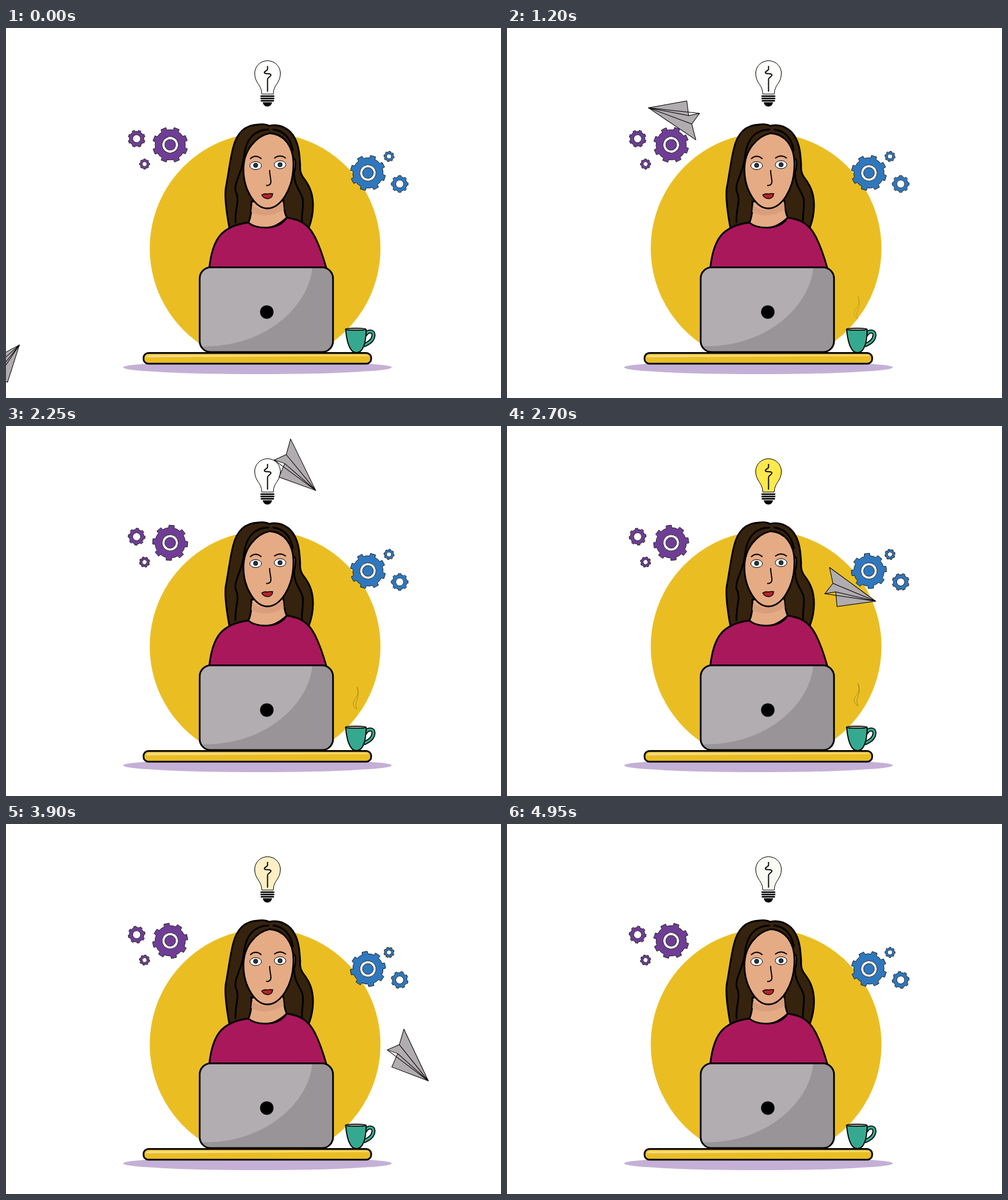
Animation, 811 px wide and 605 px high, one loop 5940 ms. Source, as an HTML page:

```html
<!DOCTYPE html>
<html lang="en">
<head>
<meta charset="utf-8">
<title>Ideas at work</title>
<style>
html, body { margin: 0; width: 100%; height: 100%; overflow: hidden; background: #fff; }
svg { display: block; width: 811px; height: 605px; }
.ink { stroke: #000; stroke-width: 2.8; stroke-linejoin: round; stroke-linecap: round; }
.thin { stroke: #000; stroke-width: 1; stroke-linejoin: round; }
.line { fill: none; }
</style>
</head>
<body>
<svg viewBox="0 0 811 605">
  <circle cx="424.500" cy="360.300" r="189" fill="#eabe23"/>
  <ellipse cx="412" cy="555" rx="220" ry="11" fill="#c4b0d6"/>

  <g id="bulb">
    <path id="glass" class="thin" d="M419 108C419 92 407.500 91 407.500 74A21 20.500 0 0 1 449.500 74C449.500 91 438 92 438 108Z"/>
    <path class="line" stroke="#000" stroke-width="1.800" d="M428.500 62V67C428.500 71 422 70 423.500 73.500C425 76 434 73 434 77C433 81 428.500 80 428.500 84V104"/>
    <path stroke="#000" stroke-width="2.600" stroke-linecap="round" d="M418 111.500H438.500M418 115.200H438.500M418.500 119H438"/>
    <path d="M420.500 121.500H436Q434 128.500 428.300 128.500Q422.500 128.500 420.500 121.500Z"/>
  </g>

  <g id="woman">
    <path class="ink" fill="#36230d" d="M366 327C361 300 358 278 360 262C365 236 367 215 372 196C378 172 390 159 412 158Q424 156 431 160C448 156 465 164 473 180C480 193 481 208 482 225Q481 235 486 243C497 257 503 270 503 290Q503 309 496 327Z"/>
    <path class="ink" fill="#e5ab85" d="M402 284C403 302 400 312 397 319Q428 340 460 310Q455 300 454 278Z"/>
    <path fill="#d99f7d" d="M403 290Q428 307 454 285L455 297Q428 314 402 301Z"/>
    <path class="ink" fill="#e5ab85" d="M470 214Q475 212 474 224Q474 236 470 238Z"/>
    <path class="ink" fill="#e5ab85" d="M432 172C410 177 389 199 389 231C389 266 409 295 428 295C449 295 471 265 471 222C471 193 455 173 432 172Z"/>
    <path class="ink line" d="M430 166C407 166 393 182 390 209C388 235 374 250 376 266C384 282 375 293 376 318M438 166C455 168 466 180 470 200M472 238C472 258 482 265 486 279C488 293 484 302 485 316"/>
    <g class="line" stroke="#000" stroke-width="1.900" stroke-linecap="round">
      <path d="M400.500 213.500Q409 206 418 213.500M440 212.500Q449 206 458 212.500"/>
      <path d="M432 233C432 241 434 246 434 251Q434 257.500 427 257.500"/>
    </g>
    <g fill="#fff" stroke="#000" stroke-width="1">
      <ellipse cx="409" cy="225" rx="9.500" ry="6.500"/>
      <ellipse cx="449" cy="223.500" rx="9.500" ry="6.500"/>
    </g>
    <g fill="#22354a" stroke="#000"><circle cx="409" cy="224.500" r="3.500"/><circle cx="449" cy="223.500" r="3.500"/></g>
    <path fill="#b4242b" stroke="#000" stroke-width="1.400" d="M419 273Q424 270 428 271.500Q433 270 437 271Q436 279 429 279Q422 279 419 273Z"/>
    <path class="ink" fill="#a9185b" d="M333 393C338 346 352 324 397 318C408 329 446 332 460 310C492 315 506 326 525 393Z"/>
  </g>

  <g id="desk" transform="translate(-.2 -.6)">
    <rect x="225.500" y="532" width="373" height="17.500" rx="8" fill="#eabe23"/>
    <path d="M229 539Q230 535 237 535H588Q594 535 595 537Z" fill="#f3dc90"/>
    <rect class="ink line" x="225.500" y="532" width="373" height="17.500" rx="8"/>
    <rect x="317.500" y="392" width="218.500" height="138.500" rx="18" fill="#b1adb0"/>
    <path fill="#999497" d="M502 392C497 455 425 524 320 521Q325 530.500 336 530.500H518Q536 530.500 536 512V410Q536 392 518 392Z"/>
    <rect class="ink line" x="317.500" y="392" width="218.500" height="138.500" rx="18"/>
    <circle cx="427.500" cy="465" r="11"/>
  </g>

  <g id="cup">
    <g class="line">
      <path stroke="#000" stroke-width="6.600" d="M588 503C592 494 603 494 602 503C601 511 595 515 586 519"/>
      <path stroke="#35a98f" stroke-width="3.400" d="M588 503C592 494 603 494 602 503C601 511 595 515 586 519"/>
    </g>
    <path class="ink" style="stroke-width:1.800" fill="#35a98f" d="M556.500 493C558 512 563 531 574 531C586 531 590 512 590 493Z"/>
    <ellipse cx="573" cy="492.500" rx="17" ry="1.800" fill="#b3aaa0" stroke="#000" stroke-width="1.400"/>
  </g>
  <path id="steam" class="line" stroke="#6b5510" d="M575 0C582 15 567 19 569 30Q570 34 575 37C569 25 579 20 577 9Q576 4 575 0"/>

  <g id="gears"></g>
  <g id="plane" class="thin" fill="#b0acaf">
    <path d="M0 0L-93 12L-71 27L-69 48.500L-58 34L-40 50Z"/>
    <path class="line" d="M-71 27L0 0L-69 48.500M-58 34L0 0"/>
  </g>
</svg>
<script>
const LOOP = 5940, STEP = 30, END = 4950;
const $ = id => document.getElementById(id);

function add(parent, tag, attrs) {
  const el = document.createElementNS('http://www.w3.org/2000/svg', tag);
  for (const k in attrs) el.setAttribute(k, attrs[k]);
  if (parent) parent.append(el);
  return el;
}

// Linear interpolation through [time, value, ...] keys.
function track(keys, t) {
  let i = 0;
  while (i < keys.length - 2 && t > keys[i + 1][0]) i++;
  const [a, b] = [keys[i], keys[i + 1]];
  const u = Math.min(1, Math.max(0, (t - a[0]) / (b[0] - a[0])));
  return a.slice(1).map((v, k) => v + (b[k + 1] - v) * u);
}

function gearPath(r, teeth = 8) {
  const points = [], inner = r * 0.85;
  for (let i = 0; i < teeth; i++) {
    const mid = i * 2 * Math.PI / teeth - Math.PI / 2;
    for (const [offset, radius] of [[-0.19, inner], [-0.15, r], [0.15, r], [0.19, inner], [0.39, inner * 1.01]])
      points.push([radius * Math.cos(mid + offset), radius * Math.sin(mid + offset)].map(v => v.toFixed(2)));
  }
  return 'M' + points.join('L') + 'Z';
}

const PURPLE = '#6f3d96', BLUE = '#2f78be', SPIN = 0.0714;
const gears = [
  [269, 191, 29, PURPLE, 600, END, 22],
  [214, 181, 14, PURPLE, 600, 4800, 22],
  [227, 222.5, 8.5, PURPLE, 600, 4800, 0],
  [593, 237, 29, BLUE, 2400, END, 17],
  [627.5, 210, 8.5, BLUE, 2400, 4800, 10],
  [645, 255, 14, BLUE, 2400, 4800, 0]
].map(([x, y, r, fill, start, stop, phase]) => {
  const el = add($('gears'), 'g', { fill, stroke: '#222', 'stroke-width': 0.9 });
  add(el, 'path', { d: gearPath(r) });
  add(el, 'circle', { r: r * 0.46, fill: '#fff' });
  if (r > 20) add(el, 'circle', { r: 8.8 });
  return { el, x, y, start, stop, phase };
});

// Flight of the plane's centre: start time, end time, curve.
const flight = [
  [0, 570, 'M-12 558C60 475 120 428 204 385'],
  [570, 1800, 'M204 385C290 340 340 300 340 225C340 170 305 140 265 140C225 140 208 170 208 205C208 250 240 285 275 285C305 285 325 279 347.5 248.5'],
  [1800, 2700, 'M347.5 248.5C390 189 425 66 460 66C500 66 480 252 553.5 273'],
  [2700, 3420, 'M553.5 273C610 289 648 240 648 190C648 140 620 95 565 95C510 95 473 145 480.6 202'],
  [3420, 3900, 'M480.6 202C488 266 540 274 654 384'],
  [3900, 4500, 'M654 384C720 448 820 530 910 595']
].map(([start, stop, d]) => {
  const path = add(null, 'path', { d });
  return { start, stop, path, length: path.getTotalLength() };
});

function placePlane(t) {
  const leg = flight.find(f => t < f.stop);
  $('plane').style.display = leg ? '' : 'none';
  if (!leg) return;
  const s = (t - leg.start) / (leg.stop - leg.start) * leg.length;
  const p = leg.path.getPointAtLength(s);
  const a = leg.path.getPointAtLength(Math.max(0, s - 1));
  const b = leg.path.getPointAtLength(Math.min(leg.length, s + 1));
  const turn = Math.atan2(b.y - a.y, b.x - a.x) * 180 / Math.PI + 28;
  $('plane').setAttribute('transform', `translate(${p.x} ${p.y}) rotate(${turn}) translate(46 -25)`);
}

const glow = [[2400, 254, 254, 252], [2700, 255, 233, 77], [3420, 251, 230, 140], [3900, 254, 240, 196], [4800, 250, 250, 244]];
const steamTop = [[300, 449], [1800, 432], [2700, 421], [3150, 406]];
const steamFade = [[300, 0], [570, 0.1], [1800, 0.4], [2700, 0.45], [3150, 0]];

function draw(t) {
  placePlane(t);
  for (const g of gears) {
    const turn = g.phase + SPIN * Math.max(0, Math.min(t, g.stop) - g.start);
    g.el.setAttribute('transform', `translate(${g.x} ${g.y}) rotate(${turn})`);
  }
  $('glass').setAttribute('fill', `rgb(${track(glow, t).map(Math.round)})`);
  $('steam').setAttribute('transform', `translate(0 ${track(steamTop, t)[0]})`);
  $('steam').setAttribute('opacity', track(steamFade, t)[0]);
}

const begin = performance.now();
function tick() {
  const t = (performance.now() - begin) % LOOP;
  draw(Math.min(END, Math.floor(t / STEP) * STEP));
  requestAnimationFrame(tick);
}
tick();
</script>
</body>
</html>
```
